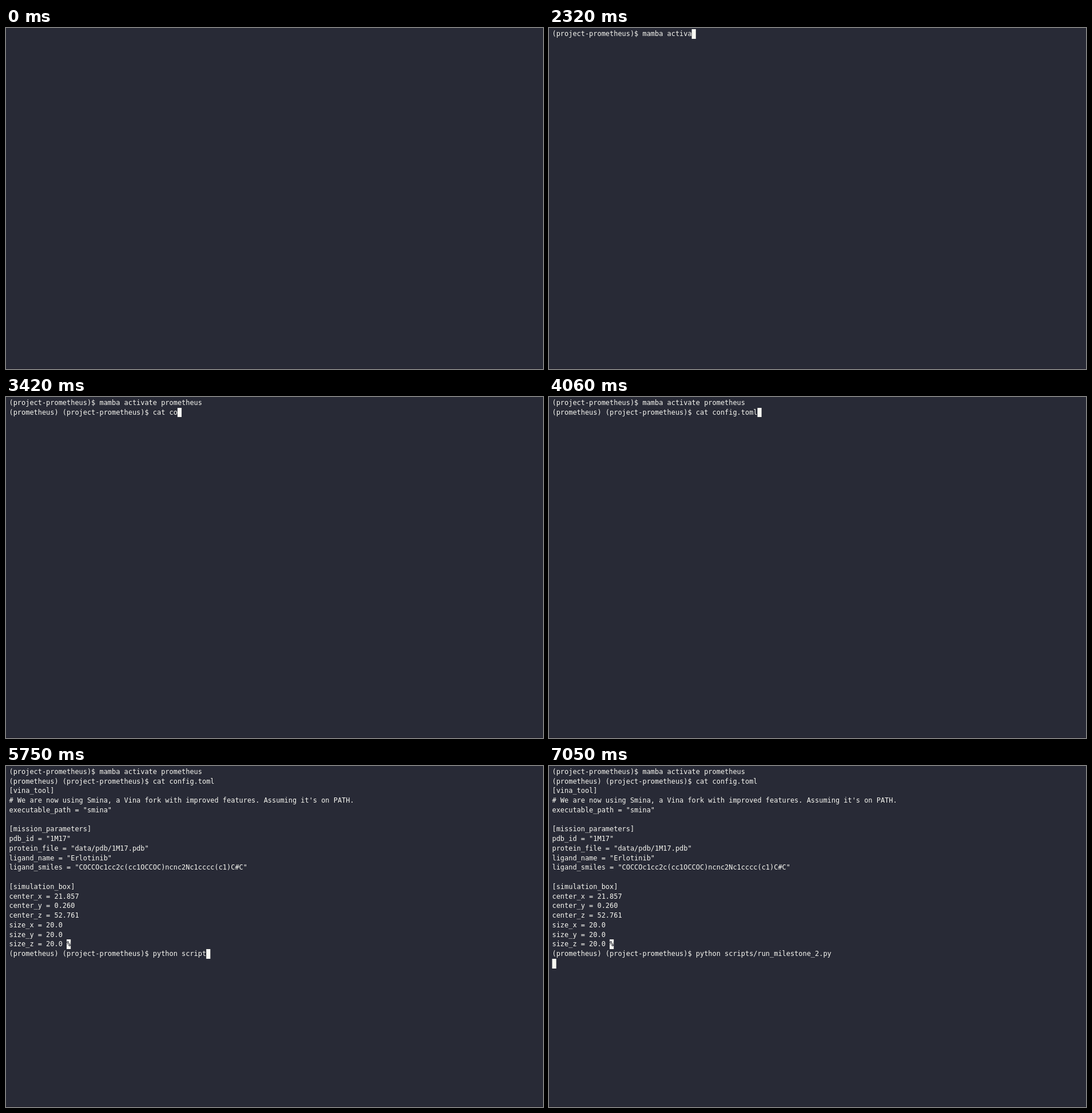
Write an HTML page with a canvas that moves like this. It is 939 by 596 pixels and loops after 8 s.

```html
<!DOCTYPE html>
<html lang="en">
<head>
<meta charset="utf-8">
<title>Terminal session</title>
<style>
  html, body { margin: 0; width: 100%; height: 100%; overflow: hidden; background: #282a36; }
  canvas { display: block; }
</style>
</head>
<body>
<canvas id="stage" width="939" height="596"></canvas>
<script>
const ctx = document.getElementById('stage').getContext('2d');
const LOOP = 8000;
const BG = '#282a36', FG = '#f8f8f2', EDGE = '#25212d';
const FONT = '11.93px "DejaVu Sans Mono", monospace';
const CELL = 7.18, LINE = 16.75, LEFT = 5.5, TOP = 1.9, BASELINE = 12;

const PROMPT = '(project-prometheus)$ ';
const ENV_PROMPT = '(prometheus) ' + PROMPT;
const CONFIG = `[vina_tool]
# We are now using Smina, a Vina fork with improved features. Assuming it's on PATH.
executable_path = "smina"

[mission_parameters]
pdb_id = "1M17"
protein_file = "data/pdb/1M17.pdb"
ligand_name = "Erlotinib"
ligand_smiles = "COCCOc1cc2c(cc1OCCOC)ncnc2Nc1cccc(c1)C#C"

[simulation_box]
center_x = 21.857
center_y = 0.260
center_z = 52.761
size_x = 20.0
size_y = 20.0
size_z = 20.0 `.split('\n');

// Each burst types its keys evenly between start and end.
const COMMANDS = [
  { row: 0, prompt: PROMPT, shown: 520, enter: 2940, bursts: [
    [1770, 2570, 'mamba activate pro'], [2590, 2740, 'metheus']] },
  { row: 1, prompt: ENV_PROMPT, shown: 2970, enter: 4140, bursts: [
    [3240, 3540, 'cat config'], [3850, 4060, '.toml']] },
  { row: 19, prompt: ENV_PROMPT, shown: 4160, enter: 7050, bursts: [
    [5140, 5210, 'py'], [5257, 5770, 'thon scripts'], [5920, 5920, '/'],
    [6090, 6410, 'run_miles'], [6430, 6430, 't'], [6465, 6465, 'on'],
    [6500, 6500, 'e'], [6680, 6890, '_2.py']] }
];

// The shell starts one line above the visible area.
const STARTUP = [[20, -1, 0], [250, -1, 56], [400, -1, 76], [460, 0, 0]];

const cellX = col => LEFT + col * CELL;
const rowY = row => Math.round(TOP + row * LINE);

function typed(bursts, t) {
  return bursts.map(([start, end, keys]) => {
    if (t < start) return '';
    if (t >= end) return keys;
    const step = (end - start) / (keys.length - 1);
    return keys.slice(0, 1 + Math.floor((t - start) / step));
  }).join('');
}

function drawText(text, row, col = 0) {
  const y = rowY(row) + BASELINE;
  [...text].forEach((ch, i) => {
    if (ch !== ' ') ctx.fillText(ch, cellX(col + i), y);
  });
}

function drawBlock(row, col) {
  ctx.fillRect(cellX(col), rowY(row), CELL, rowY(row + 1) - rowY(row));
}

function drawConfig() {
  CONFIG.forEach((text, i) => drawText(text, i + 2));
  const row = CONFIG.length + 1, col = CONFIG[CONFIG.length - 1].length;
  drawBlock(row, col);
  ctx.fillStyle = BG;
  ctx.font = 'bold ' + FONT;
  drawText('%', row, col);
  ctx.fillStyle = FG;
  ctx.font = FONT;
}

function draw(t) {
  ctx.fillStyle = BG;
  ctx.fillRect(0, 0, 939, 596);
  ctx.fillStyle = EDGE;
  ctx.fillRect(0, 595, 939, 1);
  ctx.fillStyle = FG;
  ctx.font = FONT;

  let cursor = null;
  for (const [start, row, col] of STARTUP) if (t >= start) cursor = [row, col];
  for (const { row, prompt, shown, enter, bursts } of COMMANDS) {
    if (t < shown) break;
    const text = prompt + typed(bursts, t);
    drawText(text, row);
    cursor = t < enter ? [row, text.length] : [row + 1, 0];
  }
  if (t >= 4160) drawConfig();
  if (cursor) drawBlock(...cursor);
}

let origin;
function tick(now) {
  origin ??= now;
  draw((now - origin) % LOOP);
  requestAnimationFrame(tick);
}
draw(0);
requestAnimationFrame(tick);
</script>
</body>
</html>
```
